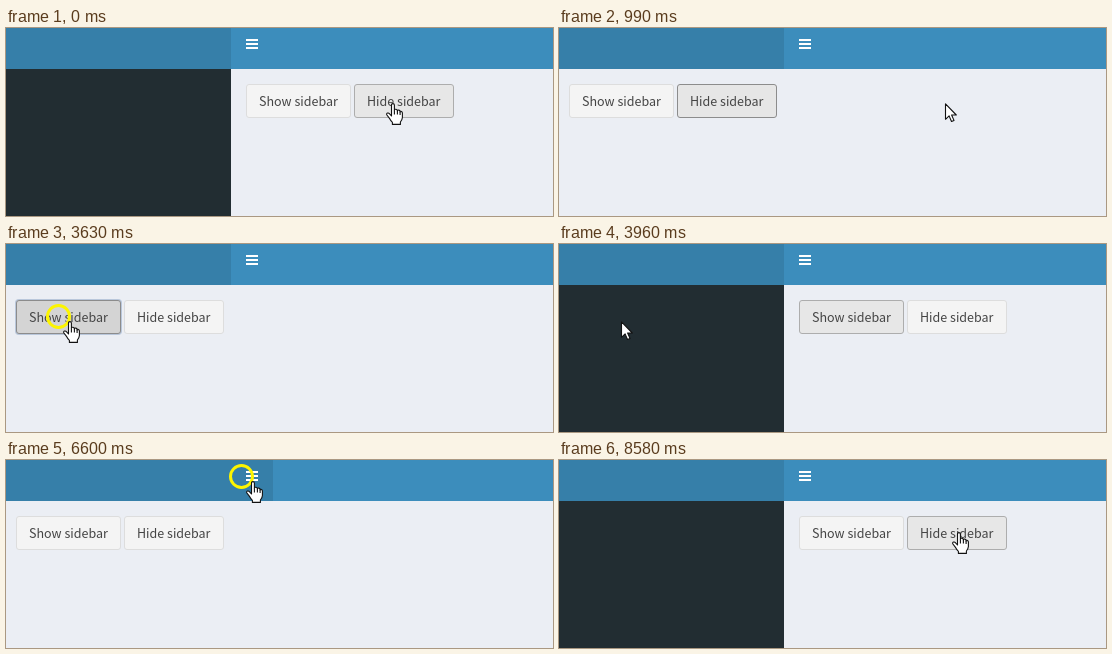
Animation, 547 px wide and 188 px high, one loop 8910 ms. Source, as an HTML page with a canvas:

```html
<!DOCTYPE html>
<html lang="en">
<head>
<meta charset="utf-8">
<title>Sidebar toggle</title>
<style>
  html, body { margin: 0; width: 100%; height: 100%; overflow: hidden; background: #ebeef4; }
  canvas { display: block; }
</style>
</head>
<body>
<canvas id="stage" width="547" height="188"></canvas>
<script>
const ctx = document.getElementById('stage').getContext('2d');
const STEP = 330, LOOP = 8910;

const BUTTON = {
  normal: ['#f4f4f4', '#ddd'],
  hover: ['#e7e7e7', '#adadad'],
  focus: ['#e6e6e6', '#8c8c8c'],
  active: ['#d4d4d4', '#8c8c8c']
};

const HAND = new Path2D('M5.5 13V2Q5.5.6 6.9.6T8.4 2V7.5Q8.6 6 10 6.2T11.4 8Q11.6 6.8 12.9 7.1T14.1 9' +
  'Q14.4 8 15.4 8.4T16.4 10V14.5Q16.3 16.5 14.4 19V21.4H6.4V19.4Q4.5 17.6 3.3 15.1L.9 12Q.2 10.6 1.4 10.1T3.6 10.9Z');
const KNUCKLES = new Path2D('M8.4 7.5V11.5M11.4 8V11.5M14.1 9V12');
const ARROW = new Path2D('M.5.8V16.3L4.1 12.9 6.5 18.5 9 17.4 6.6 12H11.3Z');

// Each cue holds its changes until the next one: step number, then the new values
const cues = [
  [0, { open: true, hand: true, x: 385, y: 75, ring: false, show: 'normal', hide: 'hover', menu: false }],
  [1, { x: 386 }],
  [2, { ring: true }],
  [3, { open: false, hand: false, ring: false, hide: 'focus' }],
  [6, { x: 278, y: 71 }],
  [7, { hand: true, x: 155, y: 77, hide: 'hover' }],
  [8, { x: 62, show: 'hover', hide: 'focus' }],
  [11, { ring: true, show: 'active', hide: 'normal' }],
  [12, { open: true, hand: false, ring: false, show: 'hover' }],
  [13, { x: 160, y: 51, show: 'focus' }],
  [14, { hand: true, x: 227, y: 29, menu: true }],
  [15, { x: 245, y: 21 }],
  [17, { ring: true, show: 'normal' }],
  [18, { open: false, ring: false }],
  [20, { ring: true }],
  [21, { open: true, ring: false }],
  [24, { x: 264, y: 32 }],
  [25, { x: 398, y: 76, menu: false, hide: 'hover' }],
  [26, { y: 72 }]
];

function rect(color, x, y, w, h) {
  ctx.fillStyle = color;
  ctx.fillRect(x, y, w, h);
}

function button(label, x, width, state) {
  const [fill, border] = BUTTON[state];
  if (state === 'active') {
    ctx.fillStyle = 'rgba(110,140,180,.4)';
    ctx.beginPath();
    ctx.roundRect(x - 1, 55, width + 2, 36, 4);
    ctx.fill();
  }
  ctx.beginPath();
  ctx.roundRect(x + .5, 56.5, width - 1, 33, 2.5);
  ctx.fillStyle = fill;
  ctx.fill();
  ctx.lineWidth = 1;
  ctx.strokeStyle = border;
  ctx.stroke();
  ctx.fillStyle = '#444';
  ctx.fillText(label, x + 13, 78);
}

function pointer({ hand, x, y }) {
  const shape = hand ? HAND : ARROW;
  ctx.save();
  ctx.translate(hand ? x - 5 : x, y);
  ctx.lineJoin = 'round';
  ctx.lineWidth = 1.1;
  ctx.fillStyle = '#fff';
  ctx.strokeStyle = '#111';
  ctx.fill(shape);
  ctx.stroke(shape);
  if (hand) ctx.stroke(KNUCKLES);
  ctx.restore();
}

function draw(s) {
  rect('#ebeef4', 0, 0, 547, 188);
  rect('#3c8dbc', 0, 0, 547, 41);
  rect('#367fa9', 0, 0, s.menu ? 267 : 225, 41);
  if (s.open) rect('#222d32', 0, 41, 225, 147);
  for (const y of [11, 15, 19]) rect('#fff', 240, y, 12, 2);

  ctx.font = '12.53px "Noto Sans CJK JP", "Noto Sans CJK SC", "Noto Sans CJK", sans-serif';
  const left = s.open ? 240 : 10;
  button('Show sidebar', left, 105, s.show);
  button('Hide sidebar', left + 108, 100, s.hide);

  if (s.ring) {
    ctx.beginPath();
    ctx.arc(s.x - 9.5, s.y - 4.5, 11, 0, Math.PI * 2);
    ctx.lineWidth = 3;
    ctx.strokeStyle = '#fdf500';
    ctx.stroke();
  }
  pointer(s);
}

function tick() {
  const step = Math.floor(performance.now() % LOOP / STEP);
  const past = cues.filter(([start]) => start <= step);
  draw(Object.assign({}, ...past.map(cue => cue[1])));
  requestAnimationFrame(tick);
}
tick();
</script>
</body>
</html>
```
